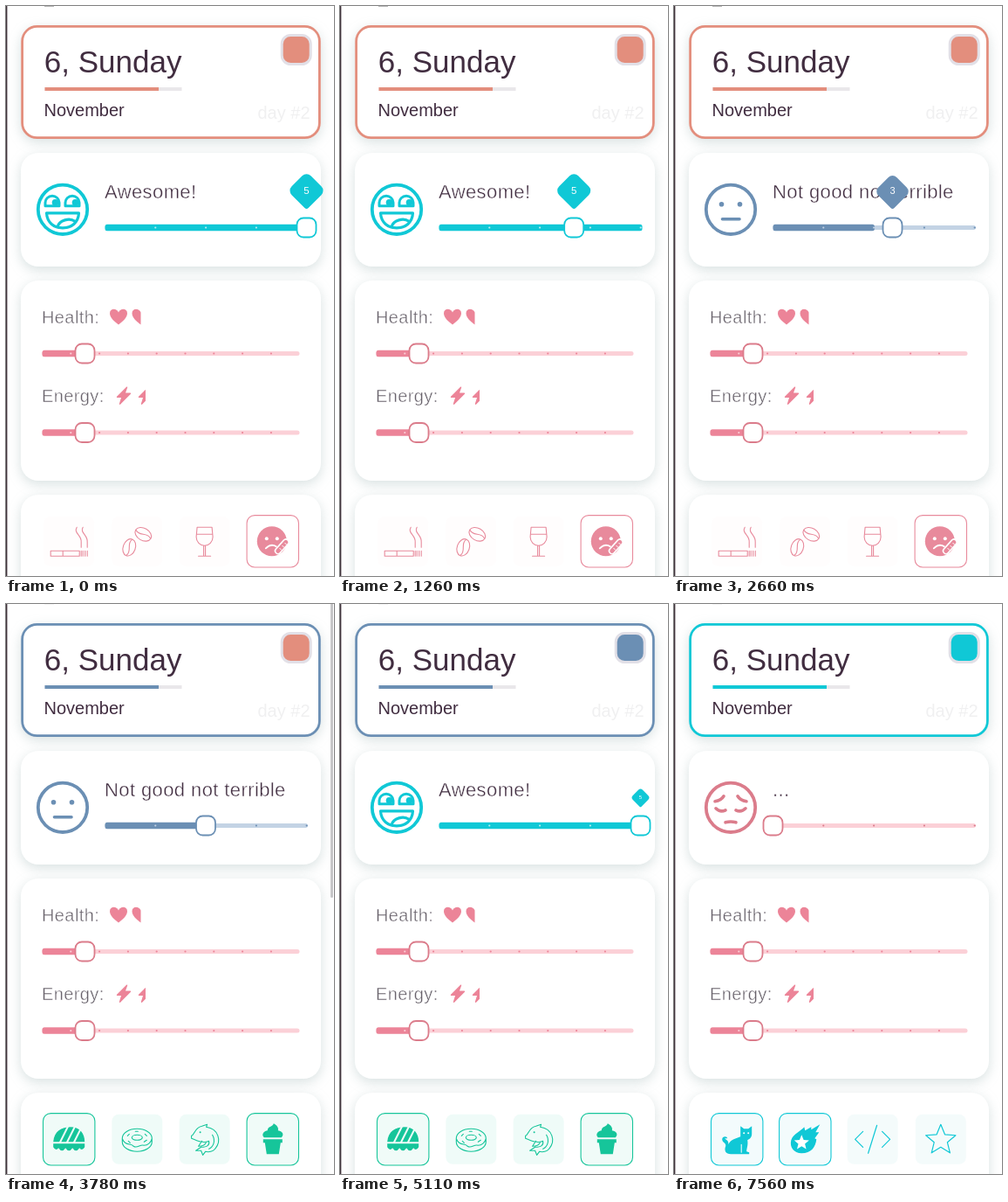
An HTML page that plays this animation: 376 px wide and 652 px high, repeating every 8000 ms.

```html
<!DOCTYPE html>
<html lang="en">
<head>
<meta charset="utf-8">
<title>Mood diary</title>
<style>
  html, body { margin: 0; height: 100%; overflow: hidden; background: #fff; }
  svg { display: block; width: 100%; height: 100%; font-family: "Liberation Sans", Arial, sans-serif; }
  .card { fill: #fff; filter: drop-shadow(0 4px 7px rgba(110, 145, 145, .27)); }
  .dark { fill: #412d40; }
  .light { stroke: #fff; stroke-width: .45; letter-spacing: .4px; }
  .line { fill: none; stroke-linecap: round; stroke-linejoin: round; }
</style>
</head>
<body>
<svg viewBox="0 0 376 652" preserveAspectRatio="none">
  <g id="cards"></g>
  <g id="header"></g>
  <g id="icons"></g>
  <g id="mood"></g>
  <g id="bar"></g>
</svg>
<script>
const LOOP = 8000;
const SALMON = '#e38e7d', BLUE = '#6b8fb4', CYAN = '#10c8d6', PINK = '#ec8498', GREEN = '#16c59a';
const ROSE = '#db7c8b', PALE_PINK = '#fbd0d7';
const $ = id => document.getElementById(id);

// Saved entries: the header and the icon card change at these times.
const SAVES = [
  { at: 0, color: SALMON, icons: 'pink', bar: 0 },
  { at: 3780, color: BLUE, icons: 'green', bar: 336 },
  { at: 6300, color: CYAN, icons: 'cyan', bar: 244 }
];

// [time, value] pairs
const THUMB_X = [[0, 344.5], [700, 270.7], [1820, 265.7], [2520, 256], [2660, 250.5], [2870, 229],
  [4410, 229], [5110, 344.5], [6860, 344.5], [7400, 113.5]];
const BUBBLE = [[0, 1], [2590, 1], [2660, .96], [2940, 0], [4270, 0], [4340, .13], [4550, 1],
  [4980, 1], [5250, 0], [6720, 0], [6790, .13], [6960, 1], [7330, 1], [7560, 0]];

const clamp = v => Math.max(0, Math.min(1, v));
const smooth = v => v * v * (3 - 2 * v);

function track(keys, t, ease = v => v) {
  const next = keys.findIndex(k => k[0] > t);
  if (next < 0) return keys[keys.length - 1][1];
  const [t0, a] = keys[next - 1], [t1, b] = keys[next];
  return a + (b - a) * ease((t - t0) / (t1 - t0));
}

function mix(a, b, k) {
  const channel = (c, i) => parseInt(c.substr(1 + 2 * i, 2), 16);
  return `rgb(${[0, 1, 2].map(i => Math.round(channel(a, i) * (1 - k) + channel(b, i) * k))})`;
}

const rect = (x, y, w, h, r, attrs) => `<rect x="${x}" y="${y}" width="${w}" height="${h}" rx="${r}" ${attrs}/>`;
const circle = (x, y, r, attrs = '') => `<circle cx="${x}" cy="${y}" r="${r}" ${attrs}/>`;
const path = (d, attrs = '') => `<path d="${d}" ${attrs}/>`;
const text = (x, y, size, str, attrs) => `<text x="${x}" y="${y}" font-size="${size}" ${attrs}>${str}</text>`;
const line = (d, color, width) => path(d, `class="line" stroke="${color}" stroke-width="${width}"`);
const at = (x, y, body, extra = '') => `<g transform="translate(${x} ${y}) ${extra}">${body}</g>`;

const thumb = (x, y, color) => rect(x - 11, y - 11, 22, 22, 7.5, `fill="#fff" stroke="${color}" stroke-width="1.8"`);

function slider({ x, y, width, dots, gap, fill, color, pale, thumbX, edge = color }) {
  let out = rect(x, y - 2.5, width, 5, 2.5, `fill="${pale}"`);
  if (fill > 0) out += rect(x, y - 3.7, fill, 7.4, 2.5, `fill="${color}"`);
  for (let i = 1; i <= dots; i++) {
    out += circle(x + gap * i, y, 1.1, `fill="${gap * i < fill ? pale : color}"`);
  }
  return out + thumb(thumbX, y, edge);
}

const star = (r, inner) => 'M' + Array.from({ length: 10 }, (_, i) => {
  const a = i * Math.PI / 5, d = i % 2 ? inner : r;
  return `${(d * Math.sin(a)).toFixed(2)} ${(-d * Math.cos(a)).toFixed(2)}`;
}).join('L') + 'Z';

function drawCards() {
  const heart = path('M0 9C-5 5-10 1-10-4C-10-10-2-10 0-5C2-10 10-10 10-4C10 1 5 5 0 9Z');
  const bolt = path('M3.5-9.5L-7.5 1.5H-2L-4.5 9.5L7.5-2.5H1Z', `stroke="${PINK}" stroke-width="1.4" stroke-linejoin="round"`);
  const half = (body, x, y) => at(x, y, `<svg x="-11" y="-11" width="11" height="22" viewBox="-11 -11 11 22">${body}</svg>`);
  const pinkSlider = y => slider({ x: 41.5, y, width: 295, dots: 8, gap: 32.8, fill: 45, color: PINK, pale: PALE_PINK, thumbX: 90.5, edge: ROSE });
  $('cards').innerHTML =
    rect(0, 0, 1.4, 652, 0, 'fill="#3c3038"') +
    [[22, 130], [168, 130], [314, 229], [559, 130]].map(([y, h]) => rect(17, y, 344, h, 20, 'class="card"')).join('') +
    text(41, 363, 20, 'Health:', 'class="light" fill="#67616a"') +
    text(41, 453, 20, 'Energy:', 'class="light" fill="#67616a"') +
    `<g fill="${PINK}">` + at(129, 355.5, heart) + half(heart, 154.5, 355.5) +
    at(135, 445.7, bolt) + half(bolt, 160, 445.7) + '</g>' +
    pinkSlider(397.5) + pinkSlider(488);
}

function drawHeader(save, squareColor) {
  $('header').innerHTML =
    rect(44, 0, 11, .6, 0, `fill="${save.at ? '#eee' : '#888'}"`) +
    rect(18.6, 23.4, 340.8, 127.3, 17, `fill="#fff" stroke="${save.color}" stroke-width="2.8"`) +
    text(43.8, 76, 35, '6, Sunday', 'class="dark"') +
    rect(44.5, 93, 157, 4, 0, 'fill="#e9e7ea"') +
    rect(44.5, 93, 130.5, 4, 0, `fill="${save.color}"`) +
    text(43.5, 125.7, 20, 'November', 'class="dark"') +
    text(288.5, 129, 20, 'day #2', 'fill="#f0f0f1"') +
    rect(316.2, 33.5, 33, 33, 10, `fill="${squareColor}" stroke="#e2e0e7" stroke-width="3"`);
}

const ICONS = {
  pink: {
    color: '#e88a9c', tile: '#fffdfd', selected: [3], tilePaint: '#fff',
    shapes: c => [
      line('M-21 11H12V17H-21ZM-7 11V17M14 11V17M16 11V17M18.5 11V17M21 11V17M9-16C5-9 15-7 14 1V7M16-16C12-10 22-7 21 1V7', c, 1.1),
      [[-9, 7, 20], [7, -8, 120]].map(([x, y, turn]) => at(x, y,
        `<ellipse rx="7" ry="10" class="line" stroke="${c}" stroke-width="1.1"/>` + line('M0-9.5C-5-3 5 3 0 9.5', c, 1.1), `rotate(${turn})`)).join(''),
      line('M-8.5-16H8.5L9.5-5A9.5 10 0 0 1-9.5-5ZM-9-8H9M-1 5V17M1 5V17M-7 17H7', c, 1.1),
      circle(-1, 0, 17, `fill="${c}"`) + circle(-7, -3, 2, 'fill="#fff"') + circle(5, -3, 2, 'fill="#fff"') +
        line('M-8 8Q-2 2 4 6', '#fff', 1.8) +
        line('M6 11L15 1', '#fff', 8) + line('M6 11L15 1', c, 5) + line('M8 8L10 10M11 5L13 7M14 2L16 4', '#fff', 1)
    ]
  },
  green: {
    color: GREEN, tile: '#effbf8', selected: [0, 3], tilePaint: '#f0fbf8',
    shapes: c => [
      path('M-18 3C-17-9-9-14 2-14C12-14 18-7 18 3Z', `fill="${c}"`) +
        line('M-11 5L-1-15M-3 5L7-15M5 5L14-13', '#f0fbf8', 2) +
        path('M-18 5H18V9Q15 14 12 10Q8 16 4 10Q0 16-4 10Q-8 16-12 10Q-15 14-18 9Z', `fill="${c}"`),
      line('M-17-1A17 11 0 0 1 17-1V3A17 11 0 0 1-17 3ZM-17-1C-14 8-7 4-4 8C0 11 4 5 8 7C12 7 16 4 17-1M-6-2A6 3 0 0 1 6-2A6 3 0 0 1-6-2M-11-4L-9-6M-2-9H1M9-6L11-4M-10 2L-8 4M8 3L11 1', c, 1.1),
      line('M-15-4C-11-5-12-13-3-15L3-17L2-14C16-12 20 2 12 11C10 14 5 15 1 14L-2 18L-4 13L-10 13L-4 9C3 9 6 7 5 2C-1 5-8 2-15-1ZM-3 2L-7 8C-2 8 1 6 2 3M9-5C13 2 10 9 5 11', c, 1.1) + circle(-5, -8, 1, `fill="${c}"`),
      path('M-11 0H11V4H9L7 17H-7L-9 4H-11ZM-10-2C-14-6-9-10-6-10C-6-15 0-14 1-18C5-16 7-13 6-10C12-9 13-5 10-2Z', `fill="${c}"`)
    ]
  },
  cyan: {
    color: CYAN, tile: '#f4fbfb', selected: [0, 1], tilePaint: '#f3fbfc',
    shapes: c => [
      path('M4-15L8-12H13L17-15V-6C17-2 14 0 12 1C13 7 11 10 11 14L14 15V17H-7C-13 17-15 13-13 8C-12 4-17 4-17 0C-17-4-11-4-11-1H-14C-12 1-9 2-10 6C-7 0-1-1 4-3Z', `fill="${c}"`) +
        circle(8, -7, 1, 'fill="#fff"') + circle(13, -7, 1, 'fill="#fff"') + line('M5 6V15', '#fff', 1),
      path('M17-17L12-8L16-8L11-1L13 0C12 9 7 16-4 16C-13 16-18 9-16 1C-14-6-4-10-1-14L0-10L7-14L7-11Z', `fill="${c}"`) +
        at(-4, 4, path(star(9, 4), 'fill="#fff"')),
      line('M-11-9L-20 0L-11 9M11-9L20 0L11 9M5-16L-5 16', c, 1.2),
      at(0, 1, line(star(18, 8), c, 1.2))
    ]
  }
};

function drawIcons(name) {
  const { color, tile, tilePaint, selected, shapes } = ICONS[name];
  $('icons').innerHTML = shapes(color).map((shape, i) => {
    const box = selected.includes(i)
      ? rect(-29.7, -29.7, 59.4, 59.4, 9, `fill="${tilePaint}" stroke="${color}" stroke-width="1.1"`)
      : rect(-29, -28.5, 58, 57, 8, `fill="${tile}"`);
    return at([72.2, 150.3, 227.6, 305.8][i], 612.3, box + shape);
  }).join('');
}

const MOODS = {
  1: {
    label: '...', color: ROSE, pale: PALE_PINK,
    face: c => line('M-18-7Q-11-8-8-13M18-7Q11-8 8-13M-17 1Q-12 6-6 3M17 1Q12 6 6 3M-6 17Q0 15.5 6 17', c, 3.6)
  },
  3: {
    label: 'Not good not terrible', color: BLUE, pale: '#c3d3e4',
    face: c => circle(-10.5, -6, 2.8, `fill="${c}"`) + circle(10.5, -6, 2.8, `fill="${c}"`) + line('M-9.5 11H10', c, 3.6)
  },
  5: {
    label: 'Awesome!', color: CYAN, pale: '#b8edf1',
    face: c => [-12, 11].map(x => at(x, -8,
        line('M-8 4V0A8 7.5 0 0 1 8 0V4Z', c, 3) + circle(3.5, 0, 3.8, `fill="${c}"`))).join('') +
      line('M-18.5 4H18.5C18 15 10 21 0 21C-10 21-18 15-18.5 4ZM-6 20C-4 12 8 9 14 13.5', c, 3.2)
  }
};

function drawMood(x, scale) {
  const value = x > 258 ? 5 : x > 172 ? 3 : 1;
  const { label, color, pale, face } = MOODS[value];
  const fill = value === 5 ? 233 : (value - 1) * 58.2;
  const bubble = path('M-8.5-15.5H8.5A7 7 0 0 1 15.5-8.5V12.5A3 3 0 0 1 12.5 15.5H-8.5A7 7 0 0 1-15.5 8.5V-8.5A7 7 0 0 1-8.5-15.5Z',
    `fill="${color}" transform="translate(0 -21.3) rotate(45)"`) +
    text(0, -17.8, 11.5, value, 'fill="#fff" text-anchor="middle"');
  $('mood').innerHTML =
    at(65, 232.8, circle(0, 0, 28.2, `fill="none" stroke="${color}" stroke-width="3.8"`) + face(color)) +
    text(113, 220, 22, label, 'class="dark light"') +
    slider({ x: 113.5, y: 253.5, width: 232.5, dots: 4, gap: 57.8, fill, color, pale, thumbX: x }) +
    (scale > 0 ? at(x, 232.5, bubble, `scale(${scale})`) : '');
}

let shownIcons;
function draw(now) {
  const t = now % LOOP;
  const index = SAVES.filter(s => s.at <= t).length - 1;
  const save = SAVES[index], before = SAVES[Math.max(0, index - 1)];
  const since = t - save.at;
  drawHeader(save, mix(before.color, save.color, smooth(clamp(since / 320))));
  if (shownIcons !== save.icons) drawIcons(shownIcons = save.icons);
  drawMood(track(THUMB_X, t, smooth), track(BUBBLE, t));
  $('bar').innerHTML = save.bar
    ? rect(372, -3, 3, save.bar + 3, 1.5, `fill="#c6c6c8" opacity="${1 - clamp((since - 560) / 280)}"`) : '';
}

drawCards();
const start = performance.now();
function frame() {
  draw(performance.now() - start);
  requestAnimationFrame(frame);
}
frame();
</script>
</body>
</html>
```
